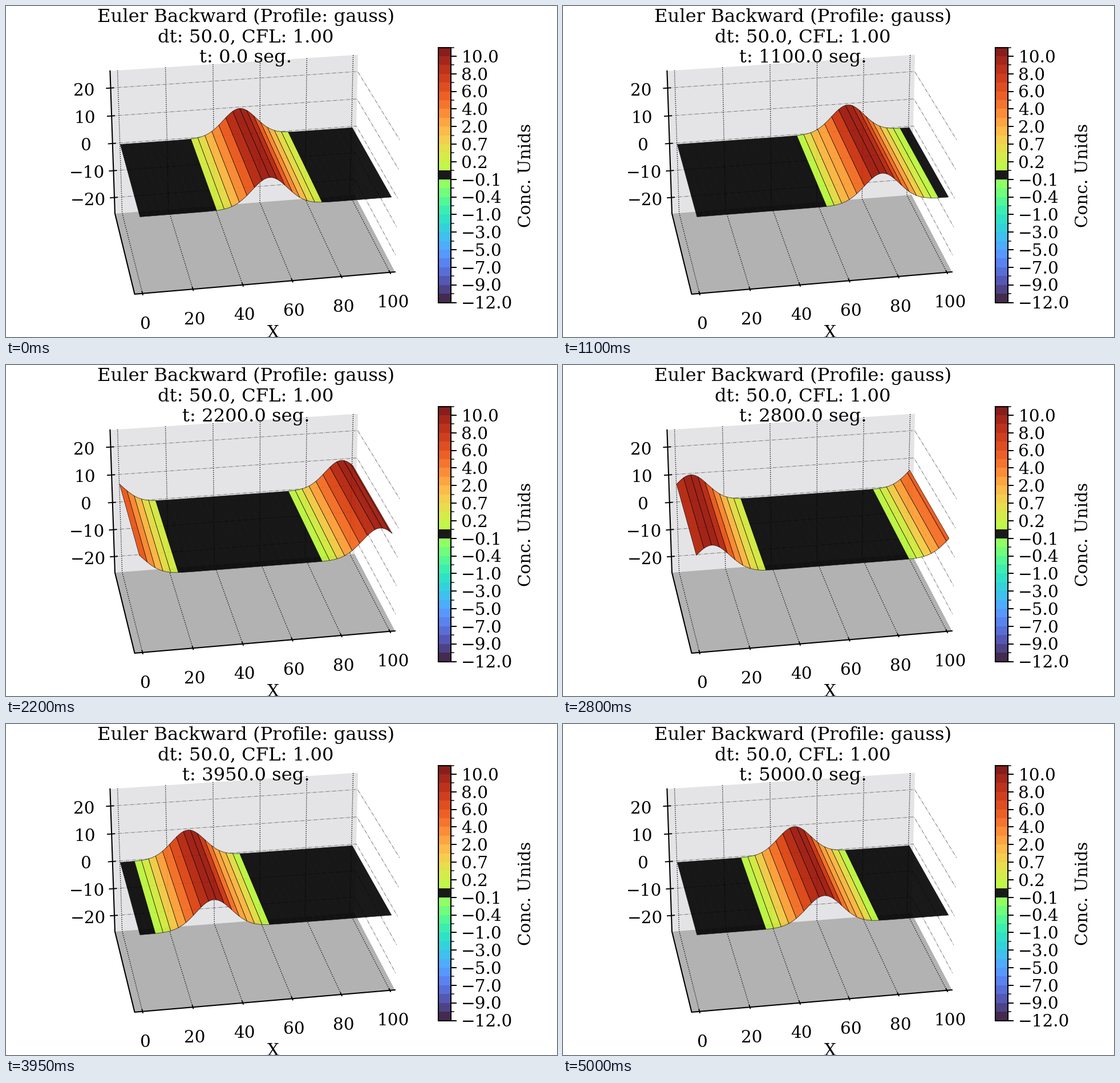
A matplotlib script that plays this animation: 966 px wide and 580 px high, repeating every 5.05 s.

```python
import matplotlib.pyplot as plt
import numpy as np
from matplotlib.animation import FuncAnimation
from matplotlib.collections import PolyCollection

W, H, DPI = 966, 580, 100
PX = 72 / DPI                      # points per pixel
ALPHA = 0.9
CELLS, CENTRE, STRIDE = 101, 51, 3

# box limits; depth runs from 0 (back wall) to 1 (front)
X0, X1 = -1 - 101 / 48, 100 + 101 / 48
Z0, Z1 = -25 - 50 / 48, 25 + 50 / 48
BACK, FRONT = 0.02, 0.98           # depth range of the surface

# x, depth, z  ->  pixel column, pixel row
LANDMARKS = np.array([
    (X0, 0, Z0, 191, 362.3), (X0, 0, Z1, 182.3, 113),
    (X1, 0, Z1, 618, 85), (X1, 0, Z0, 611, 330.5),
    (X0, 1, Z0, 225.5, 505), (X1, 1, Z0, 682, 466.5),
    (X1, 1, 20, 690, 235), (X1, 1, 0, 686, 335.5), (X1, 1, -20, 683, 436),
    (X0, 0, 20, 183.5, 144.5), (X0, 0, 0, 186.5, 241.5), (X0, 0, -20, 190, 336),
    (X1, 0, 20, 617, 115), (X1, 0, 0, 613.7, 211.5),
    (0, BACK, 0, 200.3, 242.5), (100, BACK, 0, 606.5, 213),
    (0, FRONT, 0, 235, 369.5), (100, FRONT, 0, 675, 334.5),
    (0, 1, Z0, 239.7, 503.7), (40, 1, Z0, 415, 489.5), (100, 1, Z0, 674, 467.2),
])


def box(x, depth, z):
    x, depth, z = np.broadcast_arrays(x, depth, z)
    return np.stack([(x - X0) / (X1 - X0), depth, (z - Z0) / (Z1 - Z0),
                     np.ones(x.shape)], axis=-1)


def fit_camera(marks):
    """Least-squares perspective matrix through the landmarks."""
    pts = box(*marks[:, :3].T)
    rows, rhs = [], []
    for p, (u, v) in zip(pts, marks[:, 3:] / W):
        rows.append(np.r_[p, np.zeros(4), -u * p[:3]])
        rows.append(np.r_[np.zeros(4), p, -v * p[:3]])
        rhs += [u, v]
    sol = np.linalg.lstsq(np.array(rows), np.array(rhs), rcond=None)[0]
    return np.r_[sol, 1].reshape(3, 4)


CAMERA = fit_camera(LANDMARKS)


def project(x, depth, z):
    q = box(x, depth, z) @ CAMERA.T
    return W * q[..., :2] / q[..., 2:]


# colour scale
LEVELS = np.array([-12, *range(-10, 0), -0.7, -0.4, -0.2, -0.1,
                   0.1, 0.2, 0.4, 0.7, *range(1, 11), 12])
BINS = len(LEVELS) - 1
NEUTRAL = BINS // 2
turbo = plt.get_cmap("turbo")
COLORS = np.array([turbo(int(255 / (BINS - 1) * i)) for i in range(BINS)])
COLORS[NEUTRAL, :3] = 0
COLORS[:, 3] = ALPHA
# edges are black, but vanish inside the neutral band
EDGES = np.tile([0, 0, 0, ALPHA], (BINS, 1))
EDGES[NEUTRAL, :3] = 1 - ALPHA

plt.rcParams["font.family"] = "DejaVu Serif"

fig = plt.figure(figsize=(W / DPI, H / DPI), dpi=DPI, facecolor="white")
ax = fig.add_axes([0, 0, 1, 1])
ax.set_xlim(0, W)
ax.set_ylim(H, 0)
ax.axis("off")


def path(pts, color="black", width=2.1, order=2, **style):
    pts = np.asarray(pts)
    ax.plot(pts[:, 0], pts[:, 1], color=color, lw=width * PX, zorder=order, **style)


def label(x, y, text, size=29.5, **style):
    style = {"ha": "center", "va": "baseline", "zorder": 6, **style}
    return ax.text(x, y, text, fontsize=size * PX, **style)


def title(row, text):
    return label(420.5, 28 + 35.5 * row, text, 32.3)


def minus(text):
    return text.replace("-", "\u2212")


def draw_box():
    wall = project([X0, X0, X1, X1], 0, [Z0, Z1, Z1, Z0])
    floor = project([X0, X0, X1, X1], [0, 1, 1, 0], Z0)
    ax.fill(*wall.T, color="#e4e4e6", lw=0, zorder=0)
    ax.fill(*floor.T, color="#b2b2b2", lw=0, zorder=0)

    for i, x in enumerate(range(0, 101, 20)):
        path(project(x, [0, 0, 1], [Z1, Z0, Z0]), width=1.35, order=1, ls=":")
        path(project(x, [0.98, 1.014], Z0), width=1.9)
        label(244 + 87 * i, 565.5 - 7.5 * i, str(x))

    for i, z in enumerate(range(20, -21, -10)):
        path(project([X0, X1, X1], [0, 0, 1], z), "#808080", 1.08, 1, ls="-.")
        path(project([X0 - 1.7, X0 + 1.2], 0, z), width=1.9)
        label(137 + 1.7 * i, 157 + 48 * i, minus(str(z)))

    path(project([X0, X0, X0, X1], [0, 0, 1, 1], [Z1, Z0, Z0, Z0]))
    label(468, 581, "X")


def draw_colorbar(left=757.5, right=780, top=72.5, bottom=519.5):
    edges = np.linspace(bottom, top, BINS + 1)
    for low, high, c in zip(edges, edges[1:], COLORS):
        ax.fill([left, right, right, left], [low, low, high, high],
                color=c[:3] * ALPHA + 1 - ALPHA, lw=0, antialiased=False)
    path([(left, top), (right, top), (right, bottom), (left, bottom), (left, top)],
         order=4, solid_joinstyle="miter")
    for i, (y, level) in enumerate(zip(edges, LEVELS)):
        major = i % 2 == 0
        path([(right, y), (right + (9 if major else 5), y)],
             width=2.0 if major else 1.5, order=4)
        if major:
            label(798, y + 10.8, minus(f"{level:.1f}"), ha="left")
    label(920, 297, "Conc. Unids", rotation=90, rotation_mode="anchor")


draw_box()
draw_colorbar()
title(0, "Euler Backward (Profile: gauss)")
title(1, "dt: 50.0, CFL: 1.00")
clock = title(2, "")

surface = PolyCollection([], linewidths=0.65 * PX, zorder=3)
ax.add_collection(surface, autolim=False)

XS = np.arange(CELLS)
STARTS = range(0, CELLS - 1, STRIDE)


def update(step):
    # the profile travels one cell per step on a periodic line
    dist = (XS - CENTRE - step + CELLS // 2) % CELLS - CELLS // 2
    conc = 10 * np.exp(-dist ** 2 / 100)
    back, front = project(XS, BACK, conc), project(XS, FRONT, conc)
    strips, bins = [], []
    for a in STARTS:
        cut = slice(a, a + STRIDE + 1)
        strips.append(np.vstack([back[cut], front[cut][::-1]]))
        bins.append(np.searchsorted(LEVELS, conc[cut].mean(), side="right") - 1)
    surface.set_verts(strips)
    surface.set_facecolor(COLORS[bins])
    surface.set_edgecolor(EDGES[bins])
    clock.set_text(f"t: {step * 50:.1f} seg.")
    return surface, clock


anim = FuncAnimation(fig, update, frames=101, interval=50, repeat=True, blit=False)
plt.show()
```
